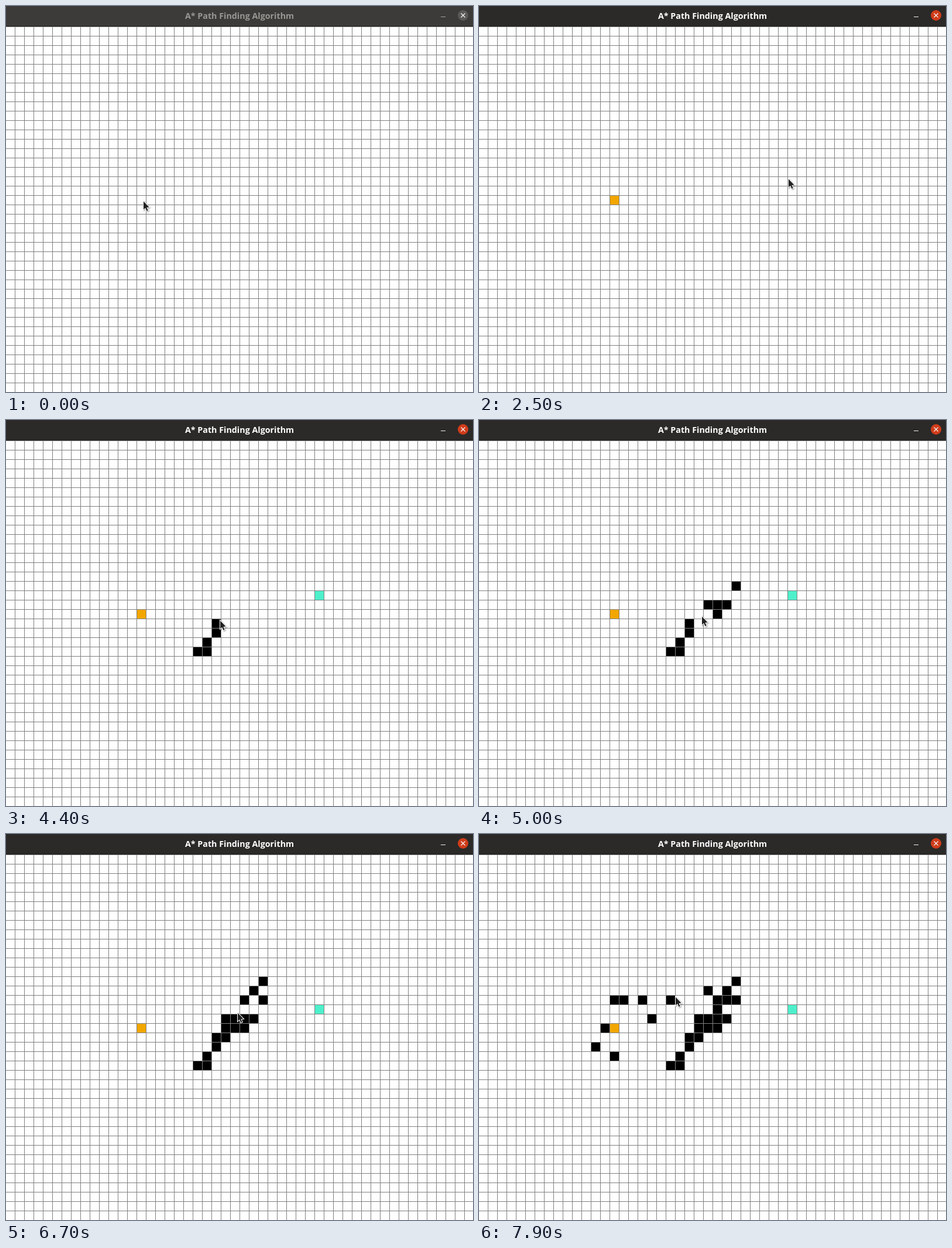
Write an HTML page with a canvas that moves like this. It is 798 px wide and 659 px high and loops after 8 s.

```html
<!DOCTYPE html>
<html lang="en">
<head>
<meta charset="utf-8">
<title>A* Path Finding Algorithm</title>
<style>
  html, body { margin: 0; width: 100%; height: 100%; overflow: hidden; background: #fefefe; }
  canvas { display: block; }
</style>
</head>
<body>
<canvas id="stage" width="798" height="659"></canvas>
<script>
const ctx = document.getElementById('stage').getContext('2d');
const LOOP = 8000, STEP = 100, CELL = 16, TOP = 36, W = 798, H = 659;
const START = '#f2a600', END = '#4df0cb', WALL = '#000';

const track = [{ x: 234, y: 332, down: false }];

function move(steps, x, y, down = false) {
  const from = track[track.length - 1];
  for (let i = 1; i <= steps; i++) {
    const k = i / steps;
    track.push({ x: from.x + (x - from.x) * k, y: from.y + (y - from.y) * k, down });
  }
}
function wait(steps, down = false) {
  const { x, y } = track[track.length - 1];
  move(steps, x, y, down);
}
const click = () => wait(1, true);
const drag = (steps, x, y) => move(steps, x, y, true);

wait(16);
click();
wait(4);
move(2, 488, 297);
wait(1);
move(1, 528, 294);
wait(2);
click();
wait(3);
move(5, 376, 402);
move(2, 339, 391);
move(1, 337, 391);

// Zigzag up and down the wall
click();
drag(1, 331, 392);
drag(3, 365, 341);
drag(2, 439, 281);
drag(2, 408, 338);
drag(1, 390, 317);
move(1, 380, 334);
drag(3, 354, 364);
drag(4, 397, 330);
drag(2, 364, 342);
drag(1, 372, 318);
drag(1, 404, 284);
drag(2, 436, 252);
drag(2, 408, 284);
move(2, 395, 304);

// Fast sweep around the start cell
drag(2, 418, 284);
drag(1, 393, 267);
drag(1, 279, 280);
drag(2, 224, 286);
wait(1);
drag(1, 214, 328);
drag(1, 199, 361);
drag(1, 229, 377);
drag(1, 292, 314);
drag(1, 335, 277);

const arrow = new Path2D('M0 0V14L3.1 11.2L5.5 16.5L7.7 15.5L5.4 10.4L9.6 10Z');

function rect(color, x, y, w, h) {
  ctx.fillStyle = color;
  ctx.fillRect(x, y, w, h);
}

// The first click sets the start, the second the end, the rest are walls
function drawCells(past) {
  past.filter(p => p.down).forEach(({ x, y }, i) => {
    const col = Math.floor(x / CELL), row = Math.floor((y - TOP) / CELL);
    rect([START, END][i] || WALL, col * CELL, TOP + row * CELL, CELL, CELL);
  });
}

function drawGrid() {
  for (let x = CELL - 1; x < W; x += CELL) rect('#808080', x, TOP - 1, 1, H);
  for (let y = TOP - 1; y < H; y += CELL) rect('#808080', 0, y, W, 1);
}

function drawBar(active) {
  rect(active ? '#2b2a28' : '#3d3b39', 0, 0, W, 34);
  rect('#201f1e', 0, 34, W, 1);
  ctx.fillStyle = active ? '#ffffff' : '#989794';
  ctx.font = 'bold 14.3px "Open Sans", "Noto Sans", sans-serif';
  ctx.textAlign = 'center';
  ctx.fillText('A* Path Finding Algorithm', 399, 22);
  rect(active ? '#f2f2f2' : '#a5a4a1', 743, 18, 8, 1);

  ctx.fillStyle = active ? '#d03c1a' : '#5a5957';
  ctx.beginPath();
  ctx.arc(781, 16, 9, 0, Math.PI * 2);
  ctx.fill();
  ctx.strokeStyle = '#f4f2f0';
  ctx.lineWidth = 1.3;
  ctx.stroke(new Path2D('M777.5 12.5l7 7m0-7l-7 7'));
}

function drawPointer({ x, y }) {
  ctx.save();
  ctx.translate(Math.round(x) + 1, Math.round(y) + 1.5);
  ctx.shadowColor = 'rgba(0,0,0,.4)';
  ctx.shadowBlur = 2;
  ctx.shadowOffsetX = ctx.shadowOffsetY = 1;
  ctx.strokeStyle = '#fff';
  ctx.lineWidth = 2;
  ctx.stroke(arrow);
  ctx.shadowColor = 'transparent';
  ctx.fillStyle = '#222';
  ctx.fill(arrow);
  ctx.restore();
}

function draw(now) {
  const t = now % LOOP;
  const past = track.slice(0, Math.floor(t / STEP) + 1);
  rect('#fefefe', 0, 0, W, H);
  drawCells(past);
  drawGrid();
  drawBar(t >= 1100);
  drawPointer(past[past.length - 1]);
}

const began = performance.now();
function tick() {
  draw(performance.now() - began);
  requestAnimationFrame(tick);
}
tick();
</script>
</body>
</html>
```
